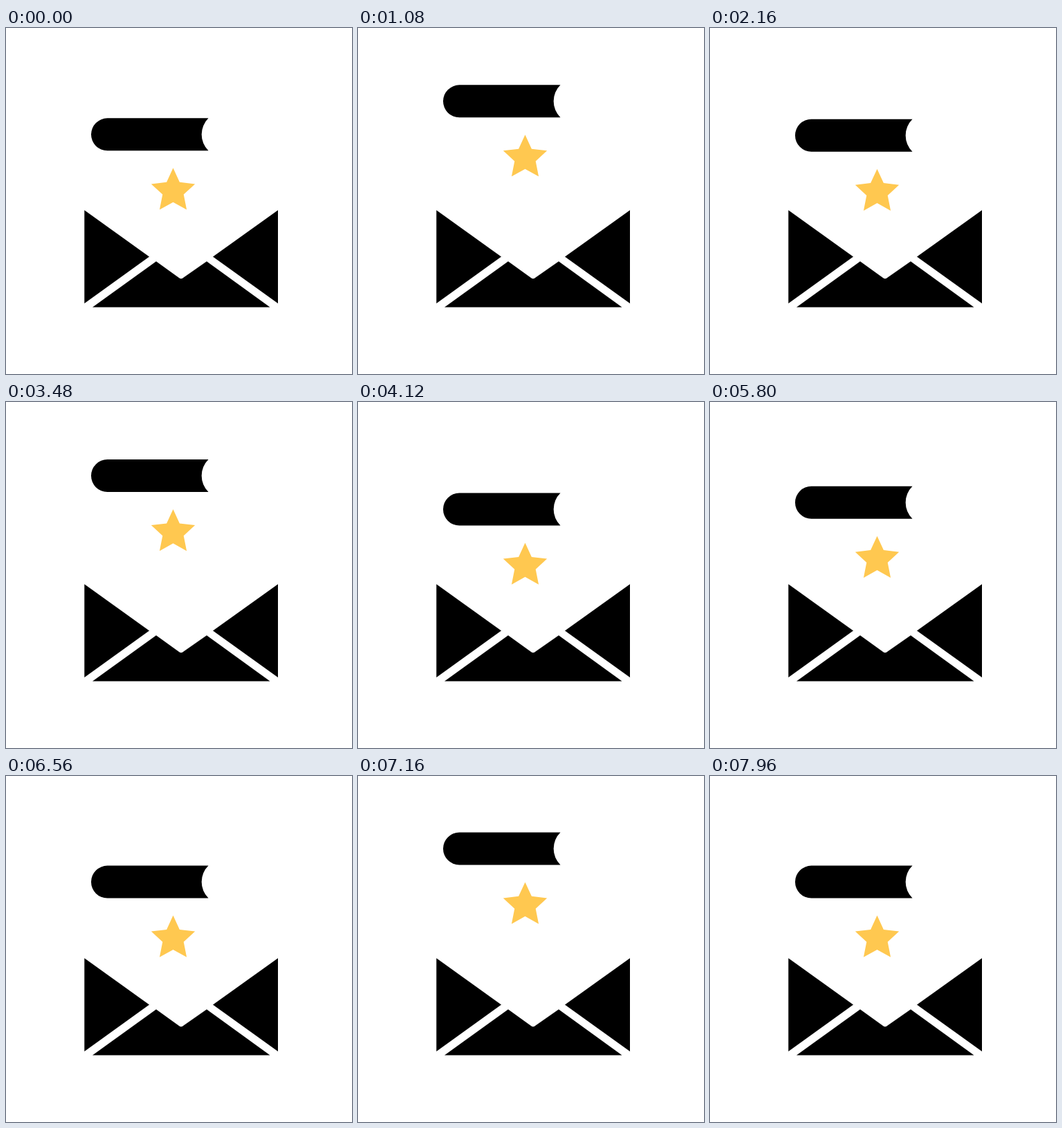
Animation, 500 px wide and 500 px high, one loop 8 s. Source, as an HTML page:

```html
<!DOCTYPE html>
<html lang="en">
<head>
<meta charset="utf-8">
<title>Envelope</title>
<style>
  html, body { margin: 0; width: 100%; height: 100%; overflow: hidden; background: #fff; }
  svg { display: block; width: 100%; height: 100%; }
</style>
</head>
<body>
<svg viewBox="0 0 500 500">
  <path d="M113.3 263.2L207 330.5L113.3 398ZM393 263.2L299 330.5L393 398Z"/>
  <path d="M125 403.6L217 337.3L250 361Q253 363.4 256 361L290 337.3L381.5 403.6Z"/>
  <g id="badge">
    <path d="M292.5 0H146.5a23.5 23.5 0 0 0 0 47H292.5A33 33 0 0 1 292.5 0Z"/>
    <polygon id="star" fill="#ffc850"/>
  </g>
</svg>
<script>
  const PERIOD = 2000, START = 328, MOVE = 932;
  const LOW = 131.7, HIGH = 81.2;
  const badge = document.getElementById('badge');
  const star = document.getElementById('star');

  const starPoints = (cx, cy, outer, inner) =>
    Array.from({ length: 10 }, (_, i) => {
      const r = i % 2 ? inner : outer, a = i * Math.PI / 5;
      return (cx + r * Math.sin(a)).toFixed(2) + ',' + (cy - r * Math.cos(a)).toFixed(2);
    }).join(' ');

  // cubic-bezier(.85, 0, .15, 1)
  function ease(x) {
    if (x <= 0) return 0;
    if (x >= 1) return 1;
    let lo = 0, hi = 1, s = 0.5;
    for (let i = 0; i < 24; i++) {
      s = (lo + hi) / 2;
      const q = 1 - s;
      if (2.55 * s * q * q + 0.45 * s * s * q + s * s * s < x) lo = s; else hi = s;
    }
    return s * s * (3 - 2 * s);
  }

  function render(ms) {
    const t = (ms + PERIOD - START) % PERIOD;
    const lift = ease(t / MOVE) - ease((t - MOVE) / MOVE);
    const y = LOW + (HIGH - LOW) * lift;
    badge.setAttribute('transform', `translate(0 ${y.toFixed(3)})`);
  }

  star.setAttribute('points', starPoints(241.5, 105.3, 33.3, 16));
  render(0);
  let begin;
  requestAnimationFrame(function tick(now) {
    begin ??= now;
    render(now - begin);
    requestAnimationFrame(tick);
  });
</script>
</body>
</html>
```
